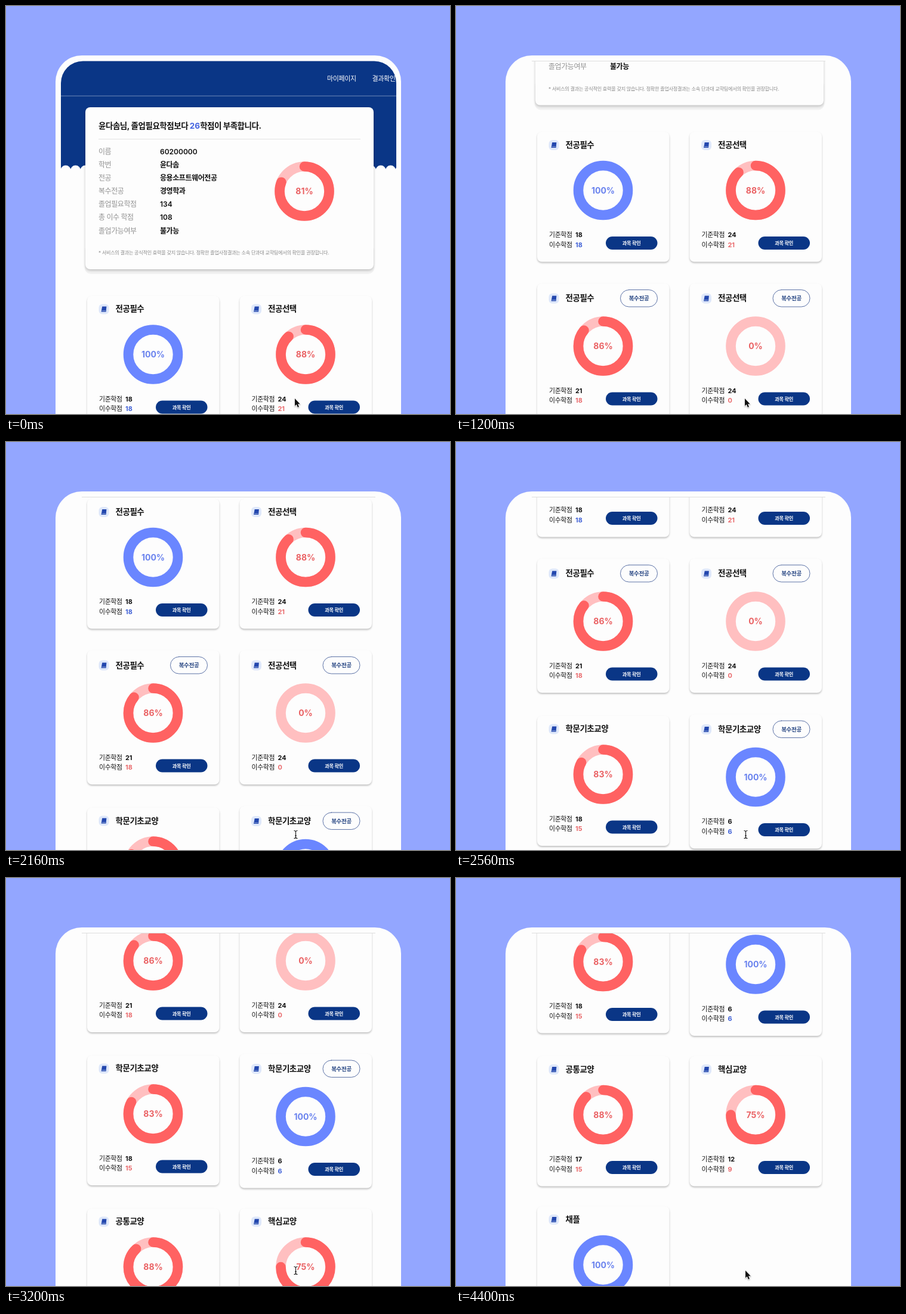
An HTML page with a canvas for the animation above (4.48 s loop, 744x685 px).

```html
<!DOCTYPE html>
<html lang="ko">
<head>
<meta charset="utf-8">
<title>졸업 학점 결과</title>
<style>
  html, body { margin: 0; width: 100%; height: 100%; overflow: hidden; background: #93a6ff; }
  canvas { display: block; width: 744px; height: 685px; }
</style>
</head>
<body>
<canvas id="stage" width="744" height="685"></canvas>
<script>
const ctx = document.getElementById('stage').getContext('2d');
const LOOP = 4480, STEP = 80;
const NAVY = '#0a3686', RED = '#ff6262', PINK = '#ffbfc0', BLUE = '#6a86ff';
const PAPER = '#fdfdfd', INK = '#111';
const STUDENT = '윤다솜';

// Scroll position over time: [ms, px]
const KEYS = [
  [0, 0], [240, 0], [320, 5], [480, 45], [640, 95], [800, 140], [880, 162], [960, 171], [1040, 171],
  [1120, 200], [1200, 275.5], [1280, 316], [1360, 341], [1520, 362], [1680, 369.5], [2000, 372], [2080, 372],
  [2240, 425], [2560, 545.5], [2880, 640], [3200, 707.5], [3760, 765.5], [4080, 772], [4160, 772],
  [4240, 810], [4320, 890], [4400, 963], [4480, 963]
];

function rate(i) {
  const [t0, y0] = KEYS[i], [t1, y1] = KEYS[i + 1];
  return (y1 - y0) / (t1 - t0);
}

// Monotone tangent: harmonic mean of the neighbouring rates
function tangent(i) {
  if (i === 0 || i === KEYS.length - 1) return 0;
  const a = rate(i - 1), b = rate(i);
  return a * b > 0 ? 2 * a * b / (a + b) : 0;
}

function scrollAt(t) {
  let i = 0;
  while (i < KEYS.length - 2 && t >= KEYS[i + 1][0]) i++;
  const [t0, y0] = KEYS[i], [t1, y1] = KEYS[i + 1];
  const d = t1 - t0, u = (t - t0) / d, v = 1 - u;
  return y0 * (1 + 2 * u) * v * v + y1 * (3 - 2 * u) * u * u
    + d * u * v * (tangent(i) * v - tangent(i + 1) * u);
}

// Draws text centred vertically on y and returns its width
function text(str, x, y, size, weight, color, align = 'left') {
  ctx.font = `${weight} ${size}px Inter, "Noto Sans CJK KR", "Noto Sans CJK", sans-serif`;
  ctx.letterSpacing = /[가-힣]/.test(str) ? `${-0.035 * size}px` : '0px';
  ctx.textAlign = align;
  ctx.fillStyle = color;
  ctx.fillText(str, x, y + size * 0.37);
  return ctx.measureText(str).width;
}

function box(x, y, w, h, r) {
  ctx.beginPath();
  ctx.roundRect(x, y, w, h, r);
}

function fillBox(x, y, w, h, r, color) {
  box(x, y, w, h, r);
  ctx.fillStyle = color;
  ctx.fill();
}

function raised(x, y, w, h, r, blur, drop, alpha) {
  ctx.save();
  ctx.shadowColor = `rgba(0,0,0,${alpha})`;
  ctx.shadowBlur = blur;
  ctx.shadowOffsetY = drop;
  fillBox(x, y, w, h, r, PAPER);
  ctx.restore();
}

function ring(x, y, pct) {
  const full = pct === 100;
  ctx.lineWidth = 16.6;
  ctx.lineCap = 'round';
  ctx.strokeStyle = full ? BLUE : PINK;
  ctx.beginPath();
  ctx.arc(x, y, 41.5, 0, Math.PI * 2);
  ctx.stroke();
  if (!full && pct > 0) {
    ctx.strokeStyle = RED;
    ctx.beginPath();
    ctx.arc(x, y, 41.5, -Math.PI / 2, Math.PI * (pct / 50 - 0.5));
    ctx.stroke();
  }
  text(pct + '%', x, y, 14, 700, full ? '#6982ee' : '#ea6264', 'center');
}

function bookIcon(x, y) {
  fillBox(x - 8.5, y - 8.5, 17, 17, 6, '#dfe8fa');
  ctx.beginPath();
  ctx.moveTo(x - 2.8, y - 4.5);
  ctx.lineTo(x + 4.4, y - 4.5);
  ctx.lineTo(x + 3.6, y + 4.5);
  ctx.lineTo(x - 4.4, y + 4.5);
  ctx.closePath();
  ctx.fillStyle = '#2347ae';
  ctx.fill();
  ctx.fillStyle = '#8fa6d8';
  ctx.fillRect(x - 3.4, y + 2.2, 6.4, 1);
}

function card(x, cy, title, pct, need, done, second) {
  const ty = cy - (second ? 80.5 : 76.5);
  const top = ty - (second ? 25 : 22);
  raised(x, top, 221.5, cy + 120 - top, 8, 3, 2, 0.24);
  bookIcon(x + 28, ty + 0.5);
  text(title, x + 47.5, ty, 13.5, 700, INK);
  if (second) {
    box(x + 139.5, ty - 14, 62, 28.5, 14.25);
    ctx.lineWidth = 0.9;
    ctx.strokeStyle = '#4a629c';
    ctx.stroke();
    text('복수전공', x + 170.5, ty, 9.5, 600, '#20407f', 'center');
  }
  ring(x + 110.5, cy, pct);
  text('기준학점', x + 20, cy + 74.5, 10.9, 500, INK);
  text(String(need), x + 64, cy + 74.5, 10.9, 700, INK);
  text('이수학점', x + 20, cy + 91, 10.9, 500, INK);
  text(String(done), x + 64, cy + 91, 10.9, 700, pct === 100 ? '#3f60d6' : '#e9696b');
  fillBox(x + 115, cy + 77.5, 86.5, 22, 11, NAVY);
  text('과목 확인', x + 158.2, cy + 88.5, 8.2, 600, '#fff', 'center');
}

function header() {
  ctx.fillStyle = NAVY;
  ctx.fillRect(92, 92, 562, 182);
  ctx.fillStyle = 'rgba(255,255,255,.42)';
  ctx.fillRect(92, 150.5, 562, 1);
  ctx.fillStyle = PAPER;
  for (let x = 100; x < 670; x += 16.5) {
    ctx.beginPath();
    ctx.arc(x, 276, 8.5, 0, Math.PI * 2);
    ctx.fill();
  }
  text('마이페이지', 538, 121.5, 11, 500, '#fff');
  text('결과확인', 613.5, 121.5, 11, 500, '#fff');
}

function summary() {
  fillBox(132, 400, 485, 50, 10, '#f2f2f2');
  raised(133, 170, 483, 272, 8, 4, 2, 0.22);
  let x = 155;
  x += text(`${STUDENT}님, 졸업필요학점보다 `, x, 201.5, 13.5, 700, INK);
  x += text('26', x, 201.5, 13.5, 700, '#4463e0');
  text('학점이 부족합니다.', x, 201.5, 13.5, 700, INK);
  ctx.fillStyle = '#e2e2e2';
  ctx.fillRect(155, 223, 439, 1);
  const rows = [
    ['이름', '60200000'], ['학번', STUDENT], ['전공', '응용소프트웨어전공'], ['복수전공', '경영학과'],
    ['졸업필요학점', '134'], ['총 이수 학점', '108'], ['졸업가능여부', '불가능']
  ];
  rows.forEach(([label, value], i) => {
    const y = 244.5 + i * 22.1;
    text(label, 155, y, 12, 500, '#929292');
    text(value, 258, y, 12, 600, INK);
  });
  ring(500, 311, 81);
  text('* 서비스의 결과는 공식적인 효력을 갖지 않습니다. 정확한 졸업사정결과는 소속 단과대 교학팀에서의 확인을 권장합니다.',
    155, 414, 8.15, 400, '#8a8a8a');
}

const LEFT = 136, RIGHT = 391.5;
const CARDS = [
  [LEFT, 585, '전공필수', 100, 18, 18],
  [RIGHT, 585, '전공선택', 88, 24, 21],
  [LEFT, 846.5, '전공필수', 86, 21, 18, true],
  [RIGHT, 846.5, '전공선택', 0, 24, 0, true],
  [LEFT, 1103.5, '학문기초교양', 83, 18, 15],
  [RIGHT, 1108, '학문기초교양', 100, 6, 6, true],
  [LEFT, 1360.5, '공통교양', 88, 17, 15],
  [RIGHT, 1360.5, '핵심교양', 75, 12, 9],
  [LEFT, 1612.5, '채플', 100, 4, 4]
];

function arrow(x, y) {
  const p = new Path2D('M0 0V12.6L2.8 10L4.8 14.8L7 13.9L5 9.2H8.8Z');
  ctx.save();
  ctx.translate(x, y);
  ctx.lineJoin = 'round';
  ctx.lineWidth = 1.6;
  ctx.strokeStyle = '#fff';
  ctx.shadowColor = 'rgba(0,0,0,.3)';
  ctx.shadowBlur = 2;
  ctx.shadowOffsetY = 1;
  ctx.stroke(p);
  ctx.shadowColor = 'transparent';
  ctx.fillStyle = '#111';
  ctx.fill(p);
  ctx.restore();
}

function beam(x, y) {
  const p = new Path2D('M-3 -6.5Q0 -6.5 0 -4.5Q0 -6.5 3 -6.5M0 -4.5V4.5M-3 6.5Q0 6.5 0 4.5Q0 6.5 3 6.5M-1.5 2H1.5');
  ctx.save();
  ctx.translate(x, y);
  ctx.lineCap = 'butt';
  ctx.lineWidth = 2.6;
  ctx.strokeStyle = 'rgba(255,255,255,.8)';
  ctx.stroke(p);
  ctx.lineWidth = 1.1;
  ctx.strokeStyle = '#111';
  ctx.stroke(p);
  ctx.restore();
}

function draw(t) {
  const y = scrollAt(t);
  ctx.fillStyle = '#93a6ff';
  ctx.fillRect(0, 0, 744, 685);
  fillBox(83, 83, 579, 700, 44, PAPER);

  ctx.save();
  box(92, 92.5, 562, 700, 37);
  ctx.clip();
  ctx.translate(0, -y);
  header();
  summary();
  for (const c of CARDS) card(...c);
  ctx.restore();

  if (y > 182) {
    ctx.fillStyle = '#dedede';
    ctx.fillRect(127, 92, 492, 1);
  }
  if (t >= 2000 && t < 3440) beam(485.5, 659);
  else arrow(t < 1600 ? 484 : 485, 659);
}

function tick(now) {
  draw(Math.floor((now % LOOP) / STEP) * STEP);
  requestAnimationFrame(tick);
}

const start = performance.now();
draw(0);
requestAnimationFrame(function run() {
  tick(Math.max(0, performance.now() - start));
});
</script>
</body>
</html>
```
